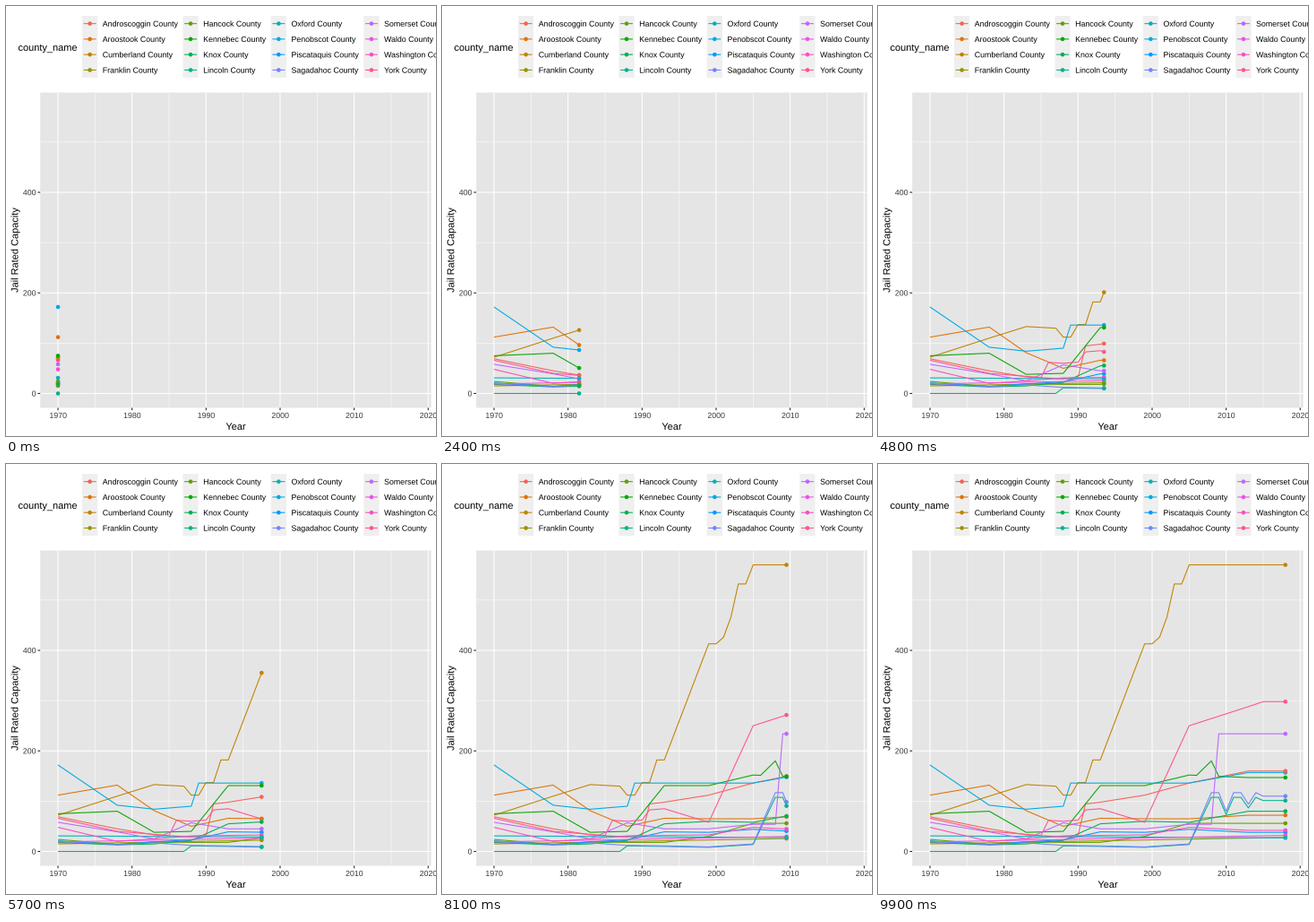
A matplotlib script for the animation above (10000 ms loop, 480 by 480 pixels).

```python
import numpy as np
import matplotlib.pyplot as plt
from matplotlib.animation import FuncAnimation
from matplotlib.patches import PathPatch, Rectangle
from matplotlib.textpath import TextPath
from matplotlib.transforms import Affine2D

SIZE, DPI = 480, 72            # one point equals one pixel
FRAMES, INTERVAL = 100, 100
FIRST, SPAN, PEAK = 1970, 48, 570
LEFT, RIGHT, TOP, BOTTOM = 38.2, 474.6, 96.6, 448.5
KEY, GAP = 17.28, 5.5
LINE_W, DOT = 1.07, 4.6
FRONT_START = 9                # dots stack in legend order from here, wrapping round

plt.rcParams["font.family"] = "Liberation Sans"

T = np.arange(0, SPAN + 0.5, 0.5)          # years since 1970
SURVEYS = (0, 8, 13, 18, 23, 29, 35, 43)


def trend(*values):
    """Straight lines between survey years; the last value holds."""
    return np.interp(T, SURVEYS[:len(values)], values)


def ramp(start, end):
    return start + (end - start) * T / SPAN


def jump(year, size, length=1):
    """A rise or fall that begins in one year and then stays."""
    return size * np.clip((T - year) / length, 0, 1)


def dip(year, size):
    return jump(year, size) - jump(year - 1, size)


def capacities():
    shared = (trend(20, 14, 17, 12, 11, 9, 15) + jump(35, 102, 3)
              + dip(40, 37) + dip(43, 23) - jump(44, 7))
    growth = (jump(19, 25) + jump(21, 45) + jump(30, 13) + jump(31, 40)
              + jump(32, 66) + jump(34, 38) - jump(17, 17))
    return {
        "Androscoggin": trend(69, 45, 33, 29, 38, 52, 76, 100) + jump(20, 60),
        "Aroostook": trend(112, 132, 81, 50, 66, 65, 65, 72),
        "Cumberland": trend(72, 110, 133, 129, 129, 360) + growth,
        "Franklin": ramp(15, 28),
        "Hancock": trend(24, 14, 19, 18, 18, 30, 56),
        "Kennebec": trend(75, 80, 38, 40, 131, 131, 152, 147) + jump(36, 30, 2) - jump(38, 30),
        "Knox": trend(18, 13, 15, 22, 55, 60, 58, 80),
        "Lincoln": 0.92 * shared * jump(17, 1),
        "Oxford": ramp(31, 27),
        "Penobscot": trend(172, 92, 84, 90, 90, 90, 90, 111) + jump(18, 46),
        "Piscataquis": trend(21, 14, 19, 23, 39, 38, 44, 38),
        "Sagadahoc": shared,
        "Somerset": trend(58, 39, 25, 57, 45, 45, 54) + jump(38, 180),
        "Waldo": ramp(19, 32),
        "Washington": trend(48, 20, 25, 31, 32, 33, 48, 42),
        "York": trend(66, 40, 34, 29, 35, 8, 200, 238) + jump(15, 31) + jump(20, 19) + jump(43, 10, 2),
    }


def hue_color(degrees, chroma=100, light=65):
    """Polar LUV colour, slightly darkened."""
    h = np.radians(degrees)
    y = ((light + 16) / 116) ** 3
    u = chroma * np.cos(h) / (13 * light) + 0.19784
    v = chroma * np.sin(h) / (13 * light) + 0.46834
    x = 9 * y * u / (4 * v)
    z = -x / 3 - 5 * y + 3 * y / v
    to_rgb = np.array([[3.2405, -1.5372, -0.4985],
                       [-0.9693, 1.8760, 0.0416],
                       [0.0556, -0.2040, 1.0573]])
    rgb = np.clip(to_rgb @ (x, y, z), 0, 1)
    srgb = np.where(rgb > 0.00304, 1.055 * rgb ** (1 / 2.4) - 0.055, 12.92 * rgb)
    return tuple(np.clip(srgb, 0, 1) ** 1.25)


def px(year):
    width = RIGHT - LEFT
    return LEFT + width * (0.05 + np.asarray(year) / SPAN) / 1.1


def py(value):
    height = BOTTOM - TOP
    return BOTTOM - height * (0.05 + np.asarray(value) / PEAK) / 1.1


fig = plt.figure(figsize=(SIZE / DPI, SIZE / DPI), dpi=DPI, facecolor="white")
ax = fig.add_axes([0, 0, 1, 1])
ax.set_xlim(0, SIZE)
ax.set_ylim(SIZE, 0)
ax.axis("off")


def box(x, y, w, h, color):
    ax.add_patch(Rectangle((x, y), w, h, fc=color, ec="none", snap=False, zorder=0))


def rule(xs, ys, color, width=LINE_W, zorder=1):
    line, = ax.plot(xs, ys, color=color, lw=width, solid_capstyle="butt",
                    solid_joinstyle="round", snap=False, zorder=zorder)
    return line


def dots(xs, ys, colors):
    return ax.scatter(xs, ys, s=DOT ** 2, c=colors, linewidths=0, zorder=5)


def label(x, y, text, size=8.8, color="black", align=0, angle=0):
    """Text on baseline y; align is the share of its width left of x."""
    path = TextPath((0, 0), text, size=size)
    place = (Affine2D().translate(-align * path.get_extents().xmax, 0)
             .scale(1, -1).rotate_deg(-angle).translate(x, y))
    ax.add_patch(PathPatch(place.transform_path(path), fc=color, lw=0, snap=False, zorder=2))


def draw_panel():
    box(LEFT, TOP, RIGHT - LEFT, BOTTOM - TOP, "#e5e5e5")
    for year in range(5, 50, 10):
        rule([px(year)] * 2, [TOP, BOTTOM], "white", LINE_W / 2)
    for value in (100, 300, 500):
        rule([LEFT, RIGHT], [py(value)] * 2, "white", LINE_W / 2)
    for year in range(0, 51, 10):
        x = px(year)
        rule([x, x], [TOP, BOTTOM], "white")
        rule([x, x], [BOTTOM, BOTTOM + GAP / 2], "#222222")
        label(x, 460, str(FIRST + year), color="#393939", align=0.5)
    for value in (0, 200, 400):
        y = py(value)
        rule([LEFT, RIGHT], [y, y], "white")
        rule([LEFT - GAP / 2, LEFT], [y, y], "#222222")
        label(33.2, y + 3.15, str(value), color="#393939", align=1)
    label((LEFT + RIGHT) / 2, 473, "Year", 11, align=0.5)
    label(13.4, (TOP + BOTTOM) / 2, "Jail Rated Capacity", 11, align=0.5, angle=90)


def draw_legend(names, colors):
    label(13.5, 50, "county_name", 11)
    columns = (85.0, 197.4, 295.7, 399.3)
    for x in columns:
        box(x, 11, KEY, 4 * KEY, "#efefef")
    spots = [(columns[i // 4], 11 + (i % 4 + 0.5) * KEY) for i in range(len(names))]
    for (x, y), name, color in zip(spots, names, colors):
        rule([x + 0.1 * KEY, x + 0.9 * KEY], [y, y], color)
        label(x + KEY + GAP, y + 3.15, name + " County")
    xs, ys = np.transpose(spots)
    dots(xs + KEY / 2, ys, colors)


data = capacities()
count = len(data)
colors = [hue_color(15 + 360 / count * i) for i in range(count)]
draw_panel()
draw_legend(list(data), colors)

xs = px(T)
ys = py(np.array(list(data.values())))
lines = [rule([], [], color, zorder=3) for color in colors]
stack = np.roll(np.arange(count), -FRONT_START)
heads = dots(np.full(count, xs[0]), ys[stack, 0], [colors[i] for i in stack])


def update(frame):
    # the reveal moves in half-year steps
    now = int((len(T) - 1) * frame / (FRAMES - 1) + 0.5)
    for line, y in zip(lines, ys):
        line.set_data(xs[:now + 1], y[:now + 1])
    heads.set_offsets(np.column_stack([np.full(count, xs[now]), ys[stack, now]]))
    return [*lines, heads]


anim = FuncAnimation(fig, update, frames=FRAMES, interval=INTERVAL,
                     repeat=True, repeat_delay=0, blit=False)
plt.show()
```
